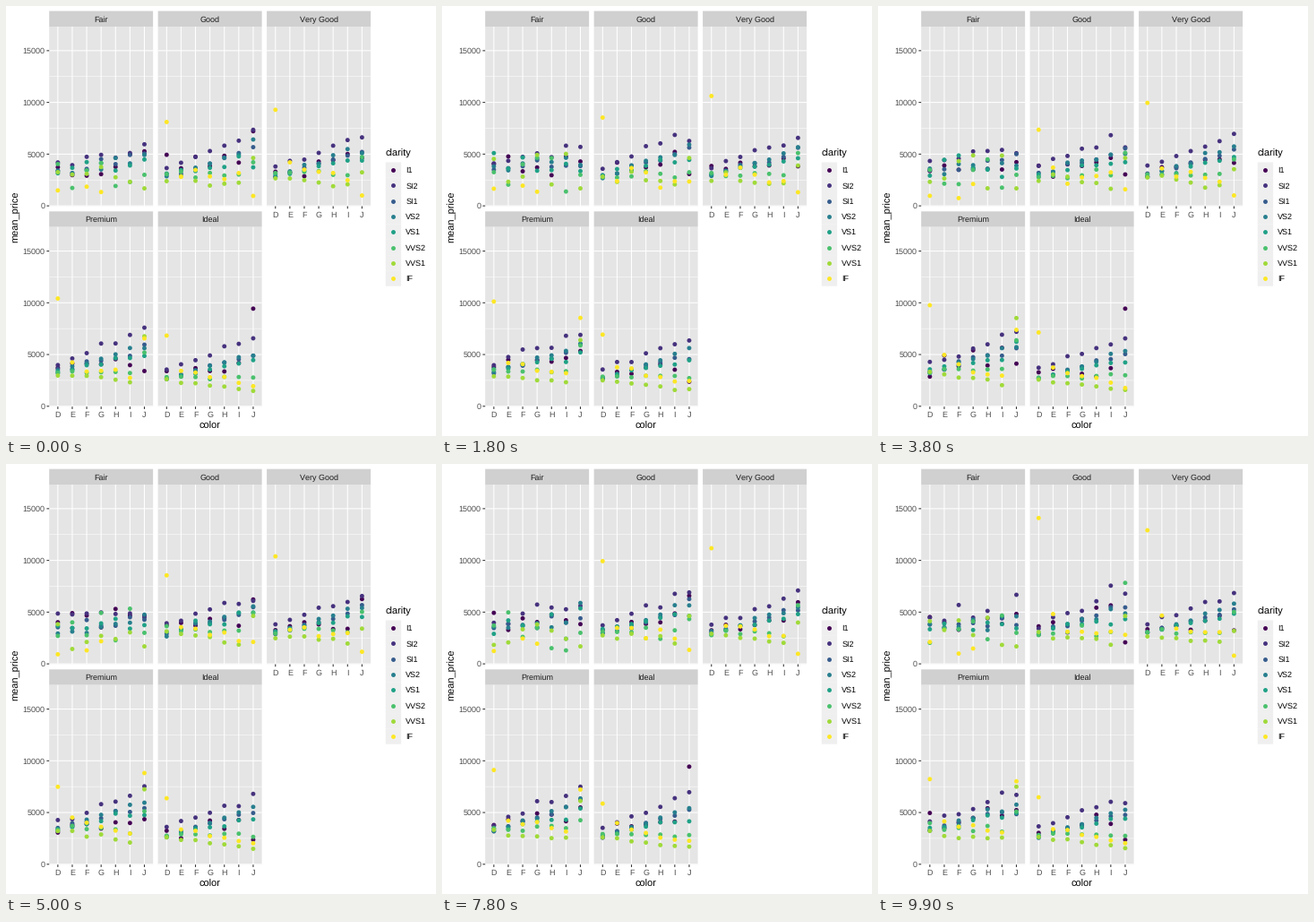
These frames come from a looping animation (480x480 px, 10 s). A matplotlib script:

```python
import numpy as np
import matplotlib.pyplot as plt
from matplotlib.animation import FuncAnimation
from matplotlib.patches import Rectangle

plt.rcParams["font.family"] = "Liberation Sans"
plt.rcParams["text.hinting"] = "none"
plt.rcParams["text.hinting_factor"] = 1

SIZE, DPI = 480, 72
FRAMES, INTERVAL = 100, 100
CUTS = ["Fair", "Good", "Very Good", "Premium", "Ideal"]
COLORS = "DEFGHIJ"
CLARITY = ["I1", "SI2", "SI1", "VS2", "VS1", "VVS2", "VVS1", "IF"]

# Panel geometry in pixels
LEFT, TOP = 48.2, 23.0
PANEL_W, PANEL_H = 115.95, 200.5
STEP_X, STEP_Y = 121.45, 223.7
STRIP_H = 17.4
SLOT = PANEL_W / 7.2
PER_PRICE = 11.55 / 1000
DOT = 4.9 ** 2

# Mean price: a straight line over color per clarity, lifted per cut
START = [3300, 3800, 3000, 2900, 3000, 3100, 2800, 4100]
SLOPE = [250, 500, 380, 450, 280, 0, -160, -300]
LIFT = [500, 0, 0, 350, -250]
FLAWLESS_D = [1600, 10000, 10300, 9100, 6600]
RARE = {("Fair", "J", "VVS1"): 1690, ("Fair", "J", "VVS2"): 3000,
        ("Good", "J", "VVS1"): 4630, ("Very Good", "J", "IF"): 1070,
        ("Premium", "J", "IF"): 8000, ("Premium", "J", "VVS1"): 7000}

# Sample counts set the spread of each resampled mean
CUT_TOTAL = [1610, 4900, 12080, 13790, 21550]
CLARITY_SHARE = [.014, .17, .24, .227, .15, .094, .068, .033]
COLOR_SHARE = [.126, .182, .177, .209, .154, .10, .052]
CUT_TILT = [-.5, -.15, -.05, 0, .1]
SPREAD = 0.7
PAIR = ("Ideal", "J", "I1")
PAIR_PRICES = (2370, 16500)


def panel_origin(k):
    return LEFT + (k % 3) * STEP_X, TOP + (k // 3) * STEP_Y


def slot_x(k, j):
    return panel_origin(k)[0] + (0.6 + j) * SLOT


def price_y(k, price):
    return panel_origin(k)[1] + PANEL_H - 0.4 - price * PER_PRICE


def mean_price(k, j, q):
    cell = CUTS[k], COLORS[j], CLARITY[q]
    if cell in RARE:
        return RARE[cell]
    if q == 7 and j == 0:
        return FLAWLESS_D[k]
    if q == 7 and k == 0:
        return 1900
    slope = SLOPE[q] * (0.4 if k == 0 else 1)
    scarce = 2000 if j == 6 and q in (5, 6) and k < 4 else 0
    return START[q] + slope * j + LIFT[k] + scarce


def sample_count(k, j, q):
    tilt = np.exp(CUT_TILT[k] * (q - 2.5))
    return max(3, CUT_TOTAL[k] * CLARITY_SHARE[q] * COLOR_SHARE[j] * tilt)


# Color, then clarity, within each cut; the rarest stones are absent
GRID = [(k, j, q) for k in range(5) for j in range(7) for q in range(8)
        if not (k == 0 and q == 7 and j not in (0, 2, 3))]
CELLS = [(CUTS[k], COLORS[j], CLARITY[q]) for k, j, q in GRID]
MEAN = np.array([mean_price(*g) for g in GRID])
COUNT = np.array([sample_count(*g) for g in GRID])
LONE = np.array([k == 0 and q in (5, 6) and j == 6 or k == 1 and q == j == 6
                 for k, j, q in GRID])
XS = np.array([slot_x(k, j) for k, j, _ in GRID])
ZERO = np.array([price_y(k, 0) for k, _, _ in GRID])
PALETTE = plt.cm.viridis(np.linspace(0, 1, len(CLARITY)))


def resample(step):
    """Bootstrap means of one draw, drawn afresh on every step."""
    rng = np.random.default_rng(step + 7)
    shape = COUNT / SPREAD ** 2
    price = np.where(LONE, MEAN, MEAN * rng.gamma(shape) / shape)
    price[CELLS.index(PAIR)] = rng.choice(PAIR_PRICES, 2).mean()
    return np.clip(price, 750, 16550)


fig = plt.figure(figsize=(SIZE / DPI, SIZE / DPI), dpi=DPI, facecolor="white")
ax = fig.add_axes([0, 0, 1, 1])
ax.set_xlim(0, SIZE)
ax.set_ylim(SIZE, 0)
ax.axis("off")


def box(x, y, w, h, color):
    ax.add_patch(Rectangle((x, y), w, h, fc=color, ec="none", lw=0,
                           snap=False, zorder=1))


def line(x0, y0, x1, y1, color="white", lw=1.07):
    ax.plot([x0, x1], [y0, y1], color=color, lw=lw, zorder=2,
            solid_capstyle="butt", snap=False)


def label(x, y, text, size=8.8, color="black", ha="center", **kw):
    kw.setdefault("va", "baseline")
    ax.text(x, y, text, fontsize=size, color=color, ha=ha, **kw)


def points(x, y, clarity):
    return ax.scatter(x, y, s=DOT, c=PALETTE[clarity], lw=0, zorder=4,
                      snap=False)


def draw_panel(k, cut):
    x, y = panel_origin(k)
    right, bottom = x + PANEL_W, y + PANEL_H
    box(x, y - STRIP_H, PANEL_W, STRIP_H, "#d0d0d0")
    box(x, y, PANEL_W, PANEL_H, "#e5e5e5")
    label((x + right) / 2, y - 5.3, cut, color="#1a1a1a")
    for price in (2500, 7500, 12500):
        line(x, price_y(k, price), right, price_y(k, price), lw=0.53)
    for price in (0, 5000, 10000, 15000):
        py = price_y(k, price)
        line(x, py, right, py)
        if k % 3 == 0:
            line(x - 2.75, py, x, py, "#333333")
            label(x - 4.9, py + 3.2, str(price), color="#4d4d4d", ha="right")
    for j, col in enumerate(COLORS):
        px = slot_x(k, j)
        line(px, y, px, bottom)
        if k >= 2:
            line(px, bottom, px, bottom + 2.75, "#333333")
            label(px, bottom + 12.2, col, color="#4d4d4d")


def draw_legend():
    label(423.7, 168, "clarity", 11, ha="left")
    for q, name in enumerate(CLARITY):
        y = 183.1 + 17.28 * q
        box(423.8, y - 8.64, 17.28, 17.28, "#efefef")
        points([432.4], [y], [q])
        label(446.4, y + 3.1, name, ha="left")


for k, cut in enumerate(CUTS):
    draw_panel(k, cut)
draw_legend()
label(227.8, 472, "color", 11)
label(10.8, 235.3, "mean_price", 11, rotation=90, va="center")
dots = points(XS, ZERO, [q for _, _, q in GRID])


def update(step):
    dots.set_offsets(np.column_stack([XS, ZERO - resample(step) * PER_PRICE]))
    return (dots,)


anim = FuncAnimation(fig, update, frames=FRAMES, interval=INTERVAL,
                     repeat=True, repeat_delay=0, blit=False)
plt.show()
```
